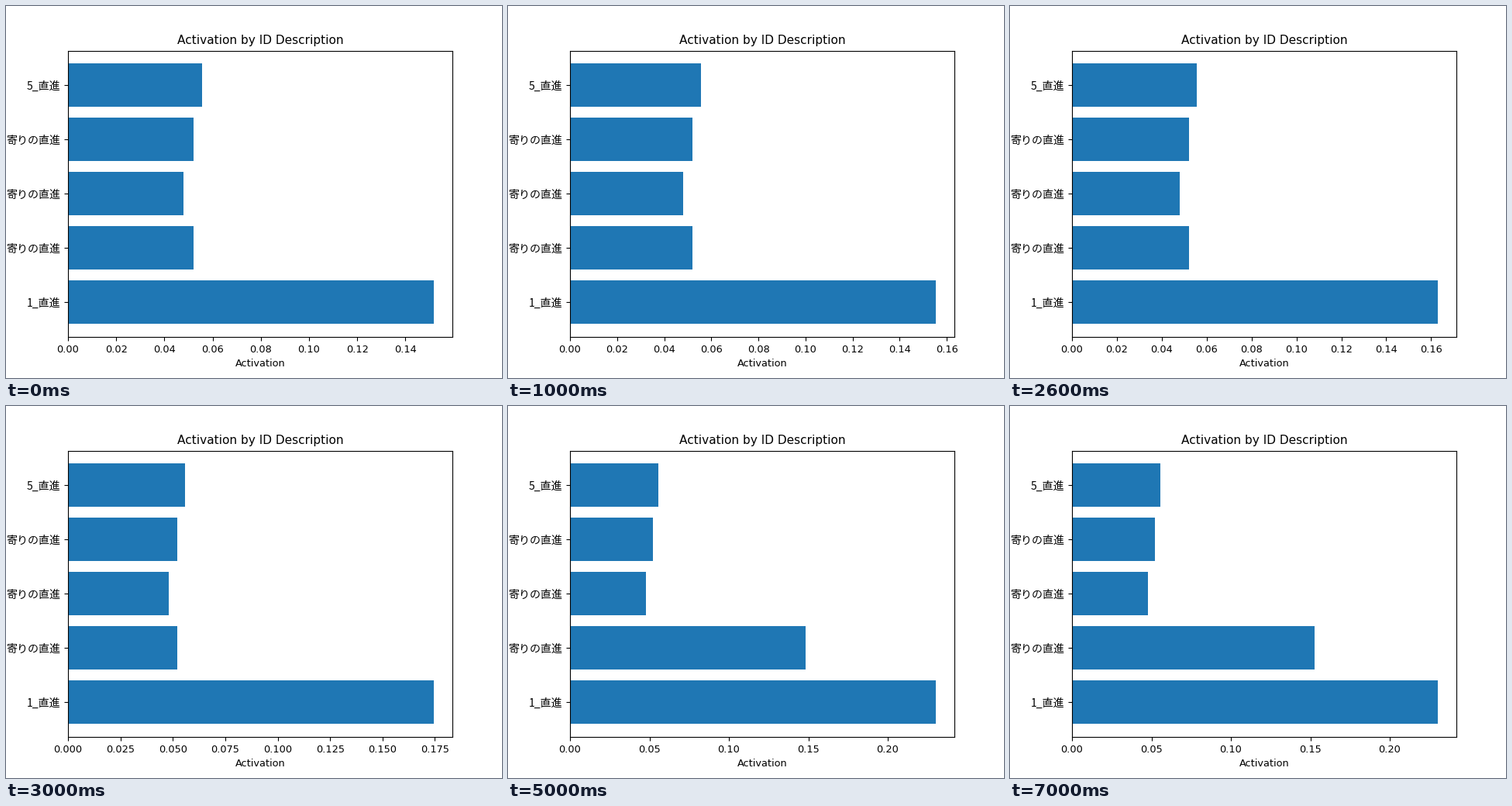
A matplotlib script for the animation above (8000 ms loop, 640 px wide and 480 px high).

```python
import matplotlib.pyplot as plt
from matplotlib.animation import FuncAnimation

plt.rcParams["font.family"] = "DejaVu Sans"
plt.rcParams["font.size"] = 9.25

LABELS = ["1_直進", "寄りの直進", "寄りの直進", "寄りの直進", "5_直進"]
RESTING = [0.052, 0.0479, 0.052, 0.0557]
STRAIGHT = [0.1519, 0.1555, 0.1631, 0.1746, 0.2304, 0.2304, 0.2304, 0.2304]
DRIFT = {5: 0.1483, 6: 0.1483, 7: 0.1527}

fig, ax = plt.subplots(figsize=(6.4, 4.8), dpi=100)


def draw(step):
    ax.clear()
    values = [STRAIGHT[step], *RESTING]
    values[1] = DRIFT.get(step, values[1])
    ax.barh(range(len(values)), values, color="#1f77b4")
    ax.set_yticks(range(len(values)), LABELS,
                  family="Noto Sans CJK JP", size=10.1)
    ax.set_xlabel("Activation")
    ax.set_title("Activation by ID Description")


anim = FuncAnimation(fig, draw, frames=len(STRAIGHT), init_func=lambda: None,
                     interval=1000, repeat=True, repeat_delay=0)
plt.show()
```
